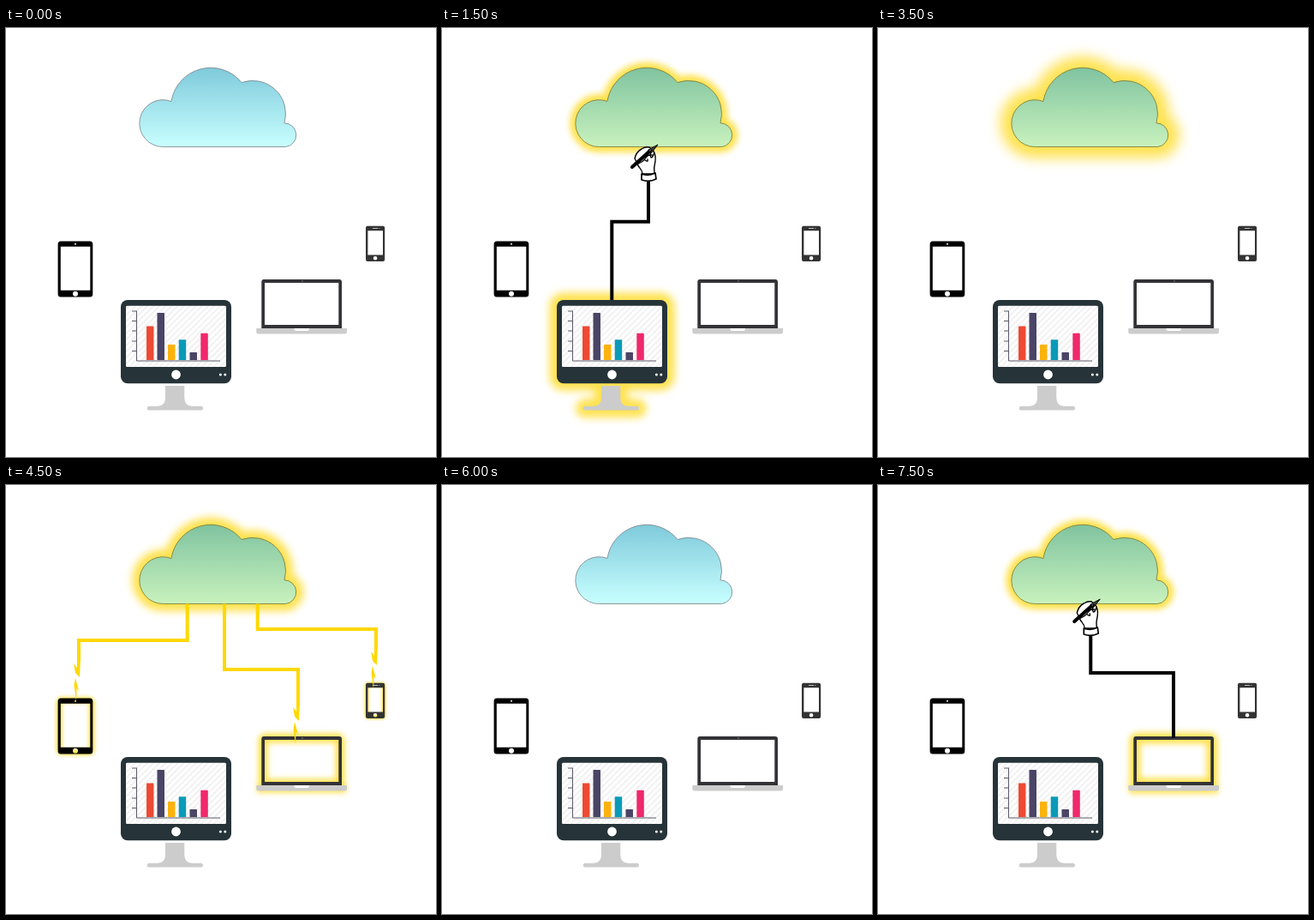
These frames come from a looping animation (502 by 500 pixels, 8000 ms). An HTML page:

```html
<!DOCTYPE html>
<html lang="en">
<head>
<meta charset="utf-8">
<title>Cloud sync</title>
<style>
  html, body { margin: 0; width: 100%; height: 100%; overflow: hidden; background: #fff; }
  svg { display: block; width: 502px; height: 500px; }
  .glow { fill: none; stroke: #ffe24f; stroke-linejoin: round; }
  .wire { fill: none; stroke: #000; stroke-width: 4; }
</style>
</head>
<body>
<svg viewBox="0 0 502 500">
  <defs>
    <linearGradient id="blue" x2="0" y2="1">
      <stop stop-color="#7fcadb"/><stop offset="1" stop-color="#c8ffff"/>
    </linearGradient>
    <linearGradient id="green" x2="0" y2="1">
      <stop stop-color="#80c3a0"/><stop offset="1" stop-color="#c8f2bd"/>
    </linearGradient>
    <pattern id="hatch" width="5" height="5" patternUnits="userSpaceOnUse" patternTransform="rotate(45)">
      <rect width="5" height="5" fill="#fff"/><rect width="1.6" height="5" fill="#f0eeee"/>
    </pattern>
    <path id="cloudShape" d="M183.5 138.5A27.4 27.4 0 1 1 193 85.5A46.5 46.5 0 0 1 275 63.5A38.7 38.7 0 0 1 325 110.8A13.9 13.9 0 0 1 326.5 138.5Z"/>
    <path id="standShape" d="M186 417H208.3V431Q208.5 440.5 217 440.7H228Q230 441 230 443.2T228 445.5H167Q164.7 445.5 164.7 443.2T167 440.7H177Q186 440.5 186 431Z"/>
    <g id="bolt">
      <path d="M-6 -3L-2 2V-10H2L1 13L-4 8Z"/>
      <path d="M-4 14L0 29L-2.5 26L-3 41L-5.5 22Z"/>
    </g>
  </defs>

  <g id="glowCloud" class="glow"><use href="#cloudShape"/></g>
  <g id="glowMonitor" class="glow"><rect x="134" y="317" width="129" height="97" rx="8"/><use href="#standShape"/></g>
  <g id="glowTablet" class="glow"><rect x="62" y="250.5" width="38" height="61" rx="3"/></g>
  <g id="glowLaptop" class="glow"><rect x="300" y="295" width="90" height="53" rx="3"/><path d="M293 353H397"/></g>
  <g id="glowPhone" class="glow"><rect x="421" y="232.5" width="20" height="38" rx="2"/></g>

  <use id="cloud" href="#cloudShape" stroke-width=".8"/>

  <path fill-rule="evenodd" d="M64 248.5H98Q101.3 248.5 101.3 252V310Q101.3 313.5 98 313.5H64Q60.6 313.5 60.6 310V252Q60.6 248.5 64 248.5ZM63.8 254.7V305.7H98.3V254.7ZM78 309.7a3 3 0 1 0 6 0a3 3 0 1 0 -6 0ZM80 251.7a1 1 0 1 0 2 0a1 1 0 1 0 -2 0Z"/>

  <path fill="#333" fill-rule="evenodd" d="M422 230.7H440Q442.2 230.7 442.2 233V269.7Q442.2 272 440 272H422Q420 272 420 269.7V233Q420 230.7 422 230.7ZM422.4 236.2V264.5H440V236.2ZM428.8 268.3a2.3 2.3 0 1 0 4.6 0a2.3 2.3 0 1 0 -4.6 0Z"/>
  <path d="M428 233.5H434M435.3 233.5H436.3" stroke="#bbb"/>

  <path fill="#333236" fill-rule="evenodd" d="M301 293H389Q392 293 392 296V350H298.3V296Q298.3 293 301 293ZM302 297V346H388.3V297Z"/>
  <path fill="#ccc" d="M292.3 350H398V354Q398 356.5 395.5 356.5H295Q292.3 356.5 292.3 354Z"/>
  <path fill="#fff" d="M336.5 350H354V351Q354 353 352 353H338.5Q336.5 353 336.5 351Z"/>
  <circle cx="346" cy="295" r=".8" fill="#888"/>

  <use href="#standShape" fill="#ccc"/>
  <rect x="134" y="317" width="129" height="97.3" rx="8" fill="#263338"/>
  <rect x="140" y="323.7" width="117" height="71.3" rx="1.5" fill="url(#hatch)"/>
  <path d="M152.5 329.5V388H250M147 330H152M147 341.5H152M147 353H152M147 365H152M147 376.5H152" fill="none" stroke="#5b5b68"/>
  <g id="bars"></g>
  <g fill="#fff">
    <circle cx="198.5" cy="404" r="5.4"/>
    <circle cx="250.4" cy="404" r="1.5"/><circle cx="255.8" cy="404" r="1.5"/>
  </g>

  <g id="links" fill="#ffd800">
    <path fill="none" stroke="#ffd800" stroke-width="4" d="M211.7 138.5V181H85V205M255 138.5V215H341V257M293.7 138.5V168H432V192"/>
    <use href="#bolt" x="85" y="211"/><use href="#bolt" x="341" y="262"/><use href="#bolt" x="432" y="197"/>
  </g>

  <path id="wireMonitor" class="wire" d="M198.3 317V225.8H241V178"/>
  <path id="wireLaptop" class="wire" d="M345 295V219H248.3V175"/>

  <!-- drawn around the end of the wire -->
  <g id="hand" stroke="#000" stroke-width="1.4" fill="#fff" stroke-linejoin="round" stroke-linecap="round">
    <path d="M-7 -8C-7 -14 -12 -15 -13 -20L-16 -26Q-14 -34 -8 -37Q-3 -40 1 -39L5 -36Q9 -30 8 -23Q6 -15 7 -8Z"/>
    <path d="M-19 -16L1 -34" stroke-width="4.2"/>
    <path d="M0 -36L11 -42L3 -32Z" fill="#444" stroke-width="1"/>
    <path d="M-12 -20Q-6 -22 -3 -27Q0 -31 4 -30M-4 -24Q0 -21 -1 -25M4 -36Q1 -31 3 -27Q5 -27 6 -31" fill="none"/>
    <path d="M-8 -8Q0 -5 8 -9L9 -2Q1 2 -8 -1Z" stroke-width="1.7"/>
  </g>
</svg>
<script>
  const $ = id => document.getElementById(id);
  const STEP = 500, STEPS = 16;

  // x, top, colour
  $('bars').innerHTML = [
    [164, 347.5, '#ee4a33'], [176.5, 332, '#4a4466'], [189, 369, '#fdb30d'],
    [201.7, 363.3, '#0a9ab8'], [214.5, 378, '#4a4466'], [227.3, 355.8, '#f0286c']
  ].map(([x, y, c]) => `<rect x="${x}" y="${y}" width="8.5" height="${387 - y}" rx=".6" fill="${c}"/>`).join('');

  // glow radius or drawn share of a wire, one value per step
  const glows = {
    Cloud:   [0, 0, 0, 13, 13, 26, 26, 26, 26, 17, 17, 0, 0, 0, 0, 13],
    Monitor: [0, 17, 17, 17],
    Tablet:  [0, 0, 0, 0, 0, 0, 0, 0, 0, 7, 15, 7],
    Laptop:  [0, 0, 0, 0, 0, 0, 0, 0, 0, 11, 23, 11, 0, 13, 13, 13],
    Phone:   [0, 0, 0, 0, 0, 0, 0, 0, 0, 5, 9, 5]
  };
  const wires = {
    Monitor: [0, .2, .65, 1, 1, 1],
    Laptop:  [0, 0, 0, 0, 0, 0, 0, 0, 0, 0, 0, 0, 0, .2, .65, 1]
  };

  const show = (el, on) => el.style.display = on ? '' : 'none';

  function draw(step) {
    for (const name in glows) {
      const r = glows[name][step] || 0, el = $('glow' + name);
      show(el, r);
      el.style.strokeWidth = r;
      el.style.filter = `blur(${r * .28}px)`;
    }
    const lit = glows.Cloud[step] > 0;
    $('cloud').setAttribute('fill', lit ? 'url(#green)' : 'url(#blue)');
    $('cloud').setAttribute('stroke', lit ? '#77752f' : '#777f86');
    show($('links'), step >= 8 && step <= 11);

    show($('hand'), false);
    for (const name in wires) {
      const share = wires[name][step] || 0, el = $('wire' + name);
      show(el, share);
      if (!share) continue;
      const full = el.getTotalLength(), end = el.getPointAtLength(full * share);
      el.style.strokeDasharray = `${full * share} ${full}`;
      show($('hand'), true);
      $('hand').setAttribute('transform', `translate(${end.x} ${end.y})`);
    }
  }

  let last = -1;
  const start = performance.now();
  function tick() {
    const step = Math.floor((performance.now() - start) / STEP) % STEPS;
    if (step !== last) draw(last = step);
    requestAnimationFrame(tick);
  }
  tick();
</script>
</body>
</html>
```
